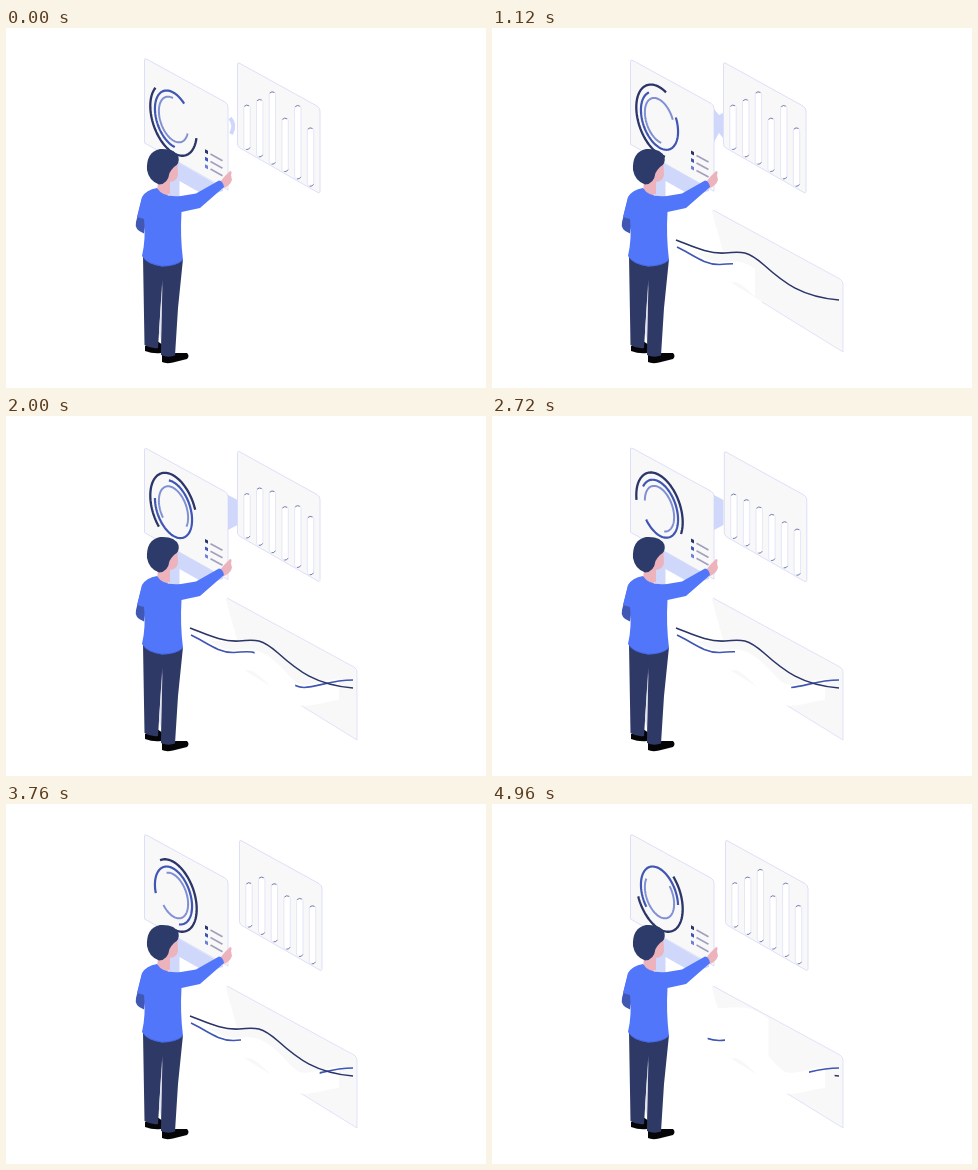
An HTML page with a canvas that plays this animation: 480x360 px, repeating every 5040 ms.

```html
<!DOCTYPE html>
<html lang="en">
<head>
<meta charset="utf-8">
<style>
  html, body { margin: 0; width: 100%; height: 100%; overflow: hidden; background: #fff; }
  canvas { display: block; width: 480px; height: 360px; }
</style>
</head>
<body>
<canvas id="stage" width="480" height="360"></canvas>
<script>
const ctx = document.getElementById('stage').getContext('2d');
const LOOP = 5040, STEP = 80;
const NAVY = '#2b3568', ROYAL = '#3f56b3', SOFT = '#8190d3', PALE = '#cfd8fa',
      PANEL = '#f8f8f9', EDGE = '#d3d9f8', SKIN = '#ecb3bd', CLOTH = '#2f3966';

const ramp = (t, from, len) => Math.min(1, Math.max(0, (t - from) / len));
const swell = (k) => (1 - Math.cos(2 * Math.PI * k)) / 2;

function fill(d, color) {
  ctx.fillStyle = color;
  ctx.fill(new Path2D(d));
}
function line(d, color, width) {
  ctx.strokeStyle = color;
  ctx.lineWidth = width;
  ctx.stroke(new Path2D(d));
}
function shifted(dx, dy, draw) {
  ctx.save();
  ctx.translate(dx, dy);
  draw();
  ctx.restore();
}

// ring chart panel
const ringPanel = 'M138.5 32 Q138.5 30 141 31.3 L219 74 Q222 76 222 79 V162 L138.5 115 Z';

// angles in degrees, clockwise, on a circle skewed into the panel
function ring(scale, from, span, color, width) {
  ctx.beginPath();
  for (let a = 0; a <= span; a += 3) {
    const r = (from + a) * Math.PI / 180, c = Math.cos(r) * scale, s = Math.sin(r) * scale;
    ctx.lineTo(167.5 + 23.2 * c, 91.5 + 13.6 * c + 33.6 * s);
  }
  ctx.strokeStyle = color;
  ctx.lineWidth = width;
  ctx.stroke();
}

function rings(t) {
  fill('M163 129 L217 160 V163 L200 168 L173.5 153 V170 H163 Z', PALE);
  shifted(0, 1.6 * Math.sin(Math.PI * ramp(t, 0, 3760)), () => {
    fill(ringPanel, PANEL);
    line(ringPanel, EDGE, .8);
    const turn = .06 * t, arc = 220 + 70 * Math.sin(Math.PI * t / LOOP);
    ring(1, 9 + turn, 210, NAVY, 2.3);
    ring(.8, 306 - arc - .062 * t, arc, ROYAL, 2.2);
    ring(.63, 16 + turn, 253, SOFT, 2);
    [NAVY, ROYAL, '#6f80d6'].forEach((color, i) => {
      const y = 124.5 + i * 7.5;
      fill(`M199 ${y - 3.2} l3 1.5 v3.4 l-3 -1.5 Z`, color);
      line(`M204.5 ${y + 1.6} l12 6.6`, '#a3a0bd', 1.7);
    });
  });
}

// bar chart panel
const barPanel = 'M231.5 36 Q231.5 34 234 35.5 L311 78 Q314 80 314 83 V163 Q314 166 311 164 L234 120 Q231.5 118.5 231.5 116 Z';
const barTops = [77, 64, 49, 68, 48, 63];

function bars(t) {
  const level = 48 + 28.5 * swell(ramp(t, 1250, 3400));
  shifted(2 * ramp(t, 2000, 1760), 1.6 * ramp(t, 1200, 2500), () => {
    fill(barPanel, PANEL);
    line(barPanel, EDGE, .8);
    barTops.forEach((full, i) => {
      const rise = i * 7.35, x = 237.8 + i * 12.7;
      const top = Math.max(full, level) + rise, base = 121.5 + rise;
      ctx.beginPath();
      ctx.roundRect(x, top, 6.4, base - top, 2.6);
      ctx.fillStyle = '#fff';
      ctx.fill();
      ctx.strokeStyle = '#d9def6';
      ctx.lineWidth = .7;
      ctx.stroke();
      line(`M${x + .6} ${top + 1.4} q2 -2.2 4.6 -.6 M${x + 2.4} ${base} q2.6 .4 3.8 -2`, '#5a659a', .8);
    });
  });
}

function link(t) {
  if (t < 80) line('M224 90 Q230 97 225 106', PALE, 4);
  else if (t < 1600) fill('M222 81 L227 87 L231 85 V110 L227 105 L222 114 Z', PALE);
  else if (t < 3200) fill('M222 79 L231.5 84 V109 L222 114 Z', PALE);
}

// line chart panel
const LEFT = 183, RIGHT = 348;
const linePanel = 'M220 184 Q220 181 223 182.5 L348 251 Q351 253 351 256 V324 L188 223 L232 227 Z';
const darkLine = 'M184 212 C200 218 215 226 233 225 C250 223 256 223 272 237 C292 255 310 269 347 272';
const blueLine = 'M185 219 C200 226 212 237 228 236.5 C240 236 246 233 258 242 C274 254 282 271.5 298 271.5 C312 271 325 264 347 264';

function span(from, to, d, color, width = 1.6) {
  if (to <= from) return;
  ctx.save();
  ctx.beginPath();
  ctx.rect(from, 170, to - from, 170);
  ctx.clip();
  line(d, color, width);
  ctx.restore();
}

function curves(t) {
  if (t < 80) return;
  const sweep = (begin) => LEFT + (RIGHT - LEFT) * ramp(t, begin, 910);
  const dark = [sweep(4080), sweep(80)], blue = [sweep(4780), sweep(800)];

  ctx.globalAlpha = ramp(t, 0, 400);
  fill(linePanel, PANEL);
  line('M221 182 L348 251 Q351 253 351 256 V324 L270 274', EDGE, .7);
  ctx.globalAlpha = 1;

  // the curves wear the panel away as they pass
  if (t > 800) shifted(0, 8, () => span(LEFT, Math.min(blue[1] + 22, 333), blueLine, '#fff', 21));
  shifted(0, -4, () => span(LEFT, dark[0] - 66, darkLine, '#fff', 34));

  // a break opens in the finished blue curve
  const open = ramp(t, 1700, 2300), mid = 268;
  span(blue[0], Math.min(blue[1], mid - 17 - 18 * open), blueLine, ROYAL);
  span(Math.max(blue[0], mid + 17 + 32 * open), blue[1], blueLine, ROYAL);
  span(dark[0], dark[1], darkLine, NAVY);
}

function man() {
  // shoes and trousers
  fill('M139 318 L139 323 Q147 326 155 325 L157 317 L151 313 Z', '#050508');
  fill('M156 327 V334 Q160 336 167 334.5 L181 331 Q184 328 181 325 L170 325 Z', '#050508');
  fill('M137 228 L138.5 317 Q145 321 152 320 L157 240 L158 228 Z', CLOTH);
  fill('M156 232 L155 327 Q162 330 169 327.5 L172 280 L177 231 Z', CLOTH);
  fill('M156.6 252 L153 305 L155 312 Z', '#dfe2ef');
  // neck, face, hand
  fill('M152 154 L163 141 Q167 134 171.5 135 L172 147 Q171 153 164 154 V166 Q157 170 151 163 Z', SKIN);
  fill('M214 154 L218.5 148.5 L224 143 Q226.5 143 225 147 L226 152 Q224 158 217 160.5 Z', SKIN);
  // shirt
  fill('M136 170 L130 194 Q128 202 138 205.5 L141 185 Z', '#4058b4');
  fill('M151 160 Q140 162 136 169 L131 189 L138 191 Q140 211 136 228 Q140 236 156 238.5 Q170 238 177 232 Q174 208 175.5 184 L194 180 L218 159 Q217 153 213 152.5 L190 165.5 L175 168 Q157 170 151 160 Z', '#5176fa');
  line('M137 229 Q142 236 156 238 Q170 238 177 232', '#4566dc', .8);
  // hair
  fill('M141 142 Q140 124 154 121 Q169 120 172.5 129 Q174 136 168 139 Q165 142 163.5 145 Q162 156 153 156.5 Q143 153 141 142 Z', '#2c3b69');
}

function draw(t) {
  ctx.fillStyle = '#fff';
  ctx.fillRect(0, 0, 480, 360);
  rings(t);
  link(t);
  bars(t);
  curves(t);
  man();
}

const start = performance.now();
function tick() {
  const t = (performance.now() - start) % LOOP;
  draw(Math.floor(t / STEP) * STEP);
  requestAnimationFrame(tick);
}
tick();
</script>
</body>
</html>
```
